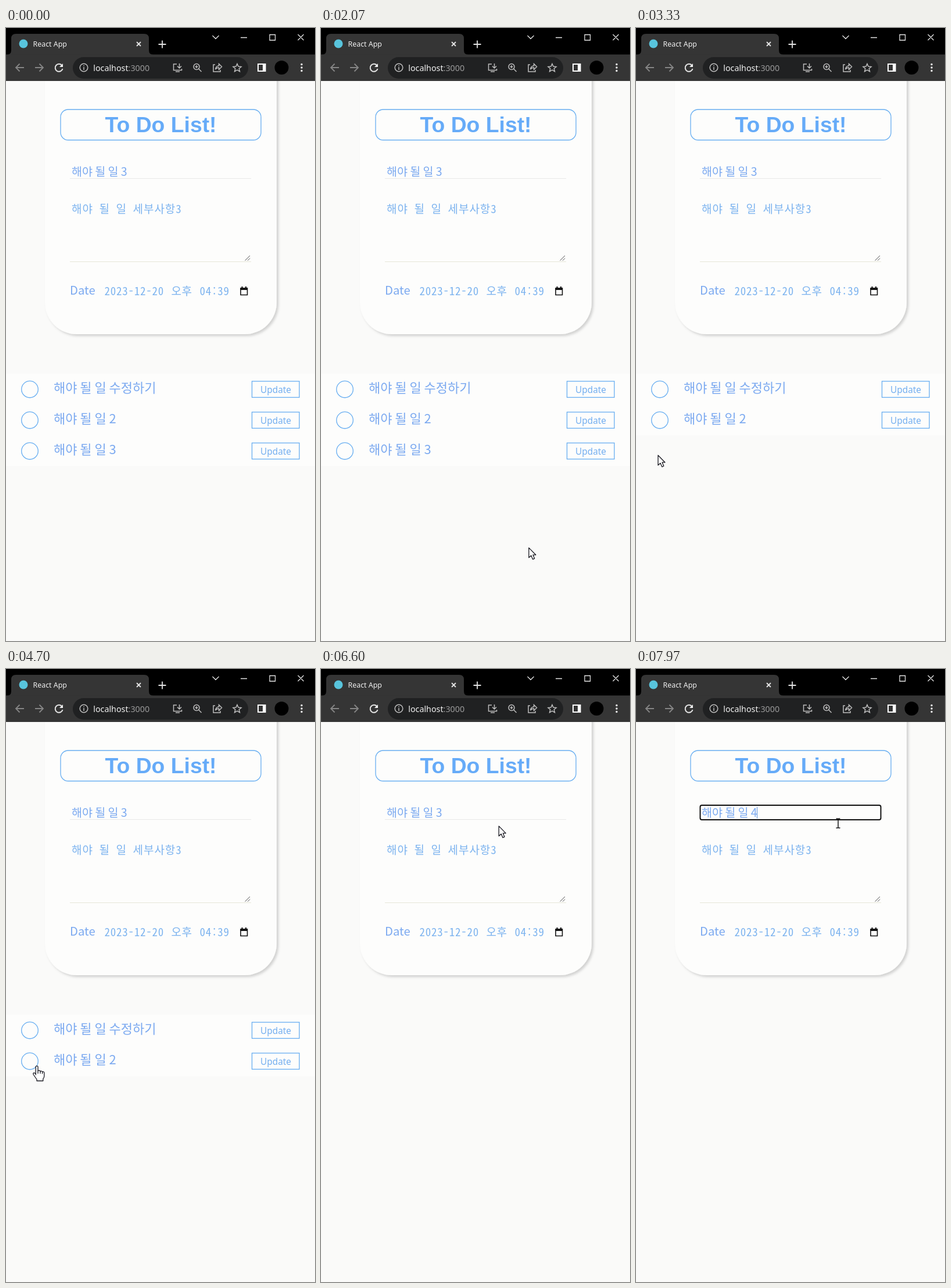
Animation, 532 px wide and 1053 px high, one loop 8000 ms. Source, as an HTML page:

```html
<!DOCTYPE html>
<html lang="ko">
<head>
<meta charset="utf-8">
<title>To Do List</title>
<style>
  html, body { margin: 0; width: 100%; height: 100%; overflow: hidden; background: #fafaf9; }
  svg { display: block; width: 532px; height: 1053px; }
  text { white-space: pre; }
  .ui { font-family: 'Noto Sans', 'Open Sans', sans-serif; }
  .ko { font-family: 'Noto Sans CJK KR', 'Noto Sans CJK', sans-serif; font-weight: 300; word-spacing: -1.3px; fill: #7ba9f0; }
  .mono { font: 300 19px 'Noto Sans Mono CJK KR', 'Noto Sans Mono', monospace; fill: #7cb3ef; }
  .title { font: bold 37.3px 'Liberation Sans', Arial, sans-serif; fill: #66abf8; }
  .line { fill: none; stroke: #68aef1; stroke-width: 1.3; }
  .icon { fill: none; stroke: #e4e4e4; stroke-width: 1.5; }
  .dim { stroke: #858585; }
  .pointer { fill: #fff; stroke: #181820; stroke-width: 1.3; stroke-linejoin: round; }
</style>
</head>
<body>
<svg viewBox="0 0 532 1053">
  <defs>
    <filter id="shadow" x="-10%" y="-10%" width="120%" height="120%">
      <feDropShadow dx="3" dy="3" stdDeviation="2" flood-color="#000" flood-opacity=".17"/>
    </filter>
  </defs>
  <rect width="532" height="1053" fill="#fafaf9"/>

  <!-- form card -->
  <path d="M67 60H466V471a55 55 0 0 1-55 55H122a55 55 0 0 1-55-55Z" fill="#fdfdfc" filter="url(#shadow)"/>
  <rect class="line" x="94" y="140" width="345" height="52.5" rx="13"/>
  <text class="title" x="266.5" y="179" text-anchor="middle">To Do List!</text>
  <path d="M110 258.5H422" stroke="#e8e8e8"/>
  <path d="M110 401.5H422" stroke="#e6e6d8"/>
  <rect id="focus" x="110.5" y="234" width="311" height="25" rx="3" fill="none" stroke="#101010" stroke-width="2"/>
  <text id="field" class="ko" x="113" y="253.5" font-size="19.6"></text>
  <path id="caret" stroke="#5b8fd8"/>
  <text class="mono" x="113" y="317.5" letter-spacing="1">해야 될 일 세부사항3</text>
  <path d="M411.5 399.5l8.5-8.5M416 399.5l4-4" stroke="#555" stroke-width="1"/>
  <text class="ko" x="110" y="458" font-size="20.3">Date</text>
  <g class="mono">
    <text x="169.5" y="458.5" letter-spacing=".75">2023-12-20</text>
    <text x="284.5" y="458.5" letter-spacing=".5">오후</text>
    <text x="333.5" y="458.5" letter-spacing=".75">04:39</text>
  </g>
  <path d="M404 447h11.5v11.5h-11.5z" fill="none" stroke="#111" stroke-width="1.6"/>
  <path d="M403.5 446.5h12.5v3.5h-12.5zM405.5 444h2v3h-2zM412 444h2v3h-2z" fill="#111"/>

  <rect id="panel" y="593.5" width="532" fill="#fdfdfc"/>
  <g id="rows"></g>

  <!-- browser window -->
  <g class="ui">
    <rect width="532" height="91" fill="#000"/>
    <path d="M1 46q8 0 8-8V18q0-8 8-8H238q8 0 8 8V38q0 8 8 8Z" fill="#353535"/>
    <rect y="45.5" width="532" height="45.5" fill="#353535"/>
    <rect x="115" y="50" width="302" height="37" rx="18.5" fill="#202122"/>
    <circle cx="30" cy="27" r="7.5" fill="#58c4dc"/>
    <text x="46.5" y="32" font-size="12.4" fill="#f0f0f0">React App</text>
    <text x="150.2" y="73.5" font-size="14.3" fill="#f2f2f2">localhost<tspan fill="#9a9a9a">:3000</tspan></text>
    <g class="icon">
      <path d="M225 24l7 7m0-7l-7 7M269 21.5v13M262.5 28h13" stroke-width="1.8"/>
      <path d="M355.5 13l5.5 5.5 5.5-5.5M404 16.5h11M454 11.5h9.5v9.5h-9.5zM502.5 11l10 10m0-10l-10 10" stroke-width="1.3"/>
      <path class="dim" d="M31 68H17m6.5-6.5L17 68l6.5 6.5M50 68H64m-6.5-6.5L64 68l-6.5 6.5" stroke-width="1.8"/>
      <path d="M96.5 64.5A6.5 6.5 0 1 0 97.5 70" stroke-width="2"/>
      <path d="M98 61v6h-6z" fill="#eee" stroke="none"/>
      <g stroke="#bdbdbd">
        <circle cx="134" cy="68" r="6.8"/>
        <path d="M134 67v5M134 64v1.6"/>
        <path d="M294 62h-5.5v10.5h14V70M292 75h7M298.5 61v8m-3.5-3.5l3.5 3.5 3.5-3.5"/>
        <circle cx="328" cy="66.5" r="5"/>
        <path d="M331.5 70l5 5M325.5 66.5h5M328 64v5"/>
        <path d="M360 63h-3v12h12v-3M360.5 71q1-6 6-6v-3.5l5 5-5 5V68q-4 0-6 3z"/>
        <path d="M398 61.5l2 4.6 5 .4-3.8 3.2 1.2 4.9-4.4-2.6-4.4 2.6 1.2-4.9-3.8-3.2 5-.4z"/>
      </g>
      <rect x="434" y="62" width="12.5" height="12" stroke="#fff" stroke-width="2"/>
      <path d="M442 62h5v12h-5z" fill="#fff" stroke="none"/>
    </g>
    <circle cx="474.5" cy="68" r="12" fill="#000"/>
    <g fill="#eee">
      <circle cx="509" cy="62.5" r="1.7"/>
      <circle cx="509" cy="68" r="1.7"/>
      <circle cx="509" cy="73.5" r="1.7"/>
    </g>
  </g>

  <!-- mouse pointers, hot spot at 0,0 -->
  <path id="arrow" class="pointer" d="M0 0V17l4-3.6 2.8 6.4 3-1.3L7.1 12.2H12Z"/>
  <g id="hand" class="pointer">
    <path d="M-1.8 15V1.7a1.9 1.9 0 0 1 3.8 0V8q3-1 4 .8 2.8-.8 3.6 1 3.2-.6 3.2 2.2V17q0 3-2 5v3.500H0V23l-5.600-8q-1.500-3 .9-3.300 1.500 0 2.900 2.300Z"/>
    <path d="M2 8v5M6 9v4M9.6 10v3.5" fill="none"/>
  </g>
  <path id="beam" d="M-3.5-8H-1l1 1 1-1h2.5M0-7V7M-3.5 8H-1l1-1 1 1h2.5" fill="none" stroke="#111" stroke-width="1.5"/>
</svg>
<script>
const LOOP = 8000, ROW = 53;
const $ = id => document.getElementById(id);
const show = (el, on) => el.style.display = on ? '' : 'none';

// label, time of removal
const tasks = [['해야 될 일 수정하기', 6120], ['해야 될 일 2', 4960], ['해야 될 일 3', 3240]];

// time, x, y, pointer
const path = [
  [1870, 420, 1040, 'arrow'], [2070, 358, 893, 'arrow'], [2400, 300, 845, 'arrow'],
  [2700, 190, 822, 'arrow'], [2960, 47, 735, 'hand'], [3240, 38, 734, 'arrow'],
  [3380, 38, 734, 'arrow'], [3500, 42, 706, 'arrow'], [3700, 50, 685, 'hand'],
  [4300, 53, 682, 'hand'], [4960, 53, 682, 'arrow'], [5030, 52, 678, 'arrow'],
  [5190, 41, 633, 'hand'], [5500, 38, 629, 'hand'], [6120, 38, 629, 'arrow'],
  [6220, 46, 612, 'arrow'], [6420, 215, 380, 'arrow'], [6600, 306, 270, 'arrow'],
  [6760, 336, 256, 'beam'], [7100, 346, 252, 'beam'], [7400, 348, 265, 'beam'],
  [8000, 348, 265, 'beam']
];

// time, field text
const typing = [[0, '해야 될 일 3'], [7560, '해야 될 일 '], [7860, '해야 될 일 4']];
const FOCUS = 7060;

$('rows').innerHTML = tasks.map(([label], i) => `<g transform="translate(0 ${i * ROW})">
  <circle class="line" cx="41" cy="620.7" r="14.3"/>
  <text class="ko" x="82" y="626" font-size="22">${label}</text>
  <rect class="line" x="423.5" y="606.8" width="81.5" height="27.7"/>
  <text class="ui" x="438" y="626.5" font-size="15.4" fill="#74aff0">Update</text></g>`).join('');
const rows = [...$('rows').children];

const latest = (list, t) => list.filter(step => step[0] <= t).pop();

function movePointer(t) {
  const a = latest(path, t);
  for (const id of ['arrow', 'hand', 'beam']) show($(id), a && a[3] === id);
  if (!a) return;
  const b = path[path.indexOf(a) + 1] || a;
  const k = b === a ? 0 : (t - a[0]) / (b[0] - a[0]);
  const mix = i => a[i] + (b[i] - a[i]) * k;
  $(a[3]).setAttribute('transform', `translate(${mix(1)} ${mix(2)})`);
}

function draw(t) {
  tasks.forEach(([, end], i) => show(rows[i], t < end));
  const left = tasks.filter(([, end]) => t < end).length;
  $('panel').setAttribute('height', left * ROW);

  const [typed, text] = latest(typing, t);
  const field = $('field');
  if (field.textContent !== text) field.textContent = text;
  const focused = t >= FOCUS;
  const blinkOn = (t - Math.max(FOCUS, typed)) % 1000 < 500;
  show($('focus'), focused);
  show($('caret'), focused && blinkOn);
  if (focused) $('caret').setAttribute('d', `M${112.5 + Math.round(field.getComputedTextLength())} 237V257`);

  movePointer(t);
}

const start = performance.now();
function tick() {
  draw((performance.now() - start) % LOOP);
  requestAnimationFrame(tick);
}
tick();
</script>
</body>
</html>
```
